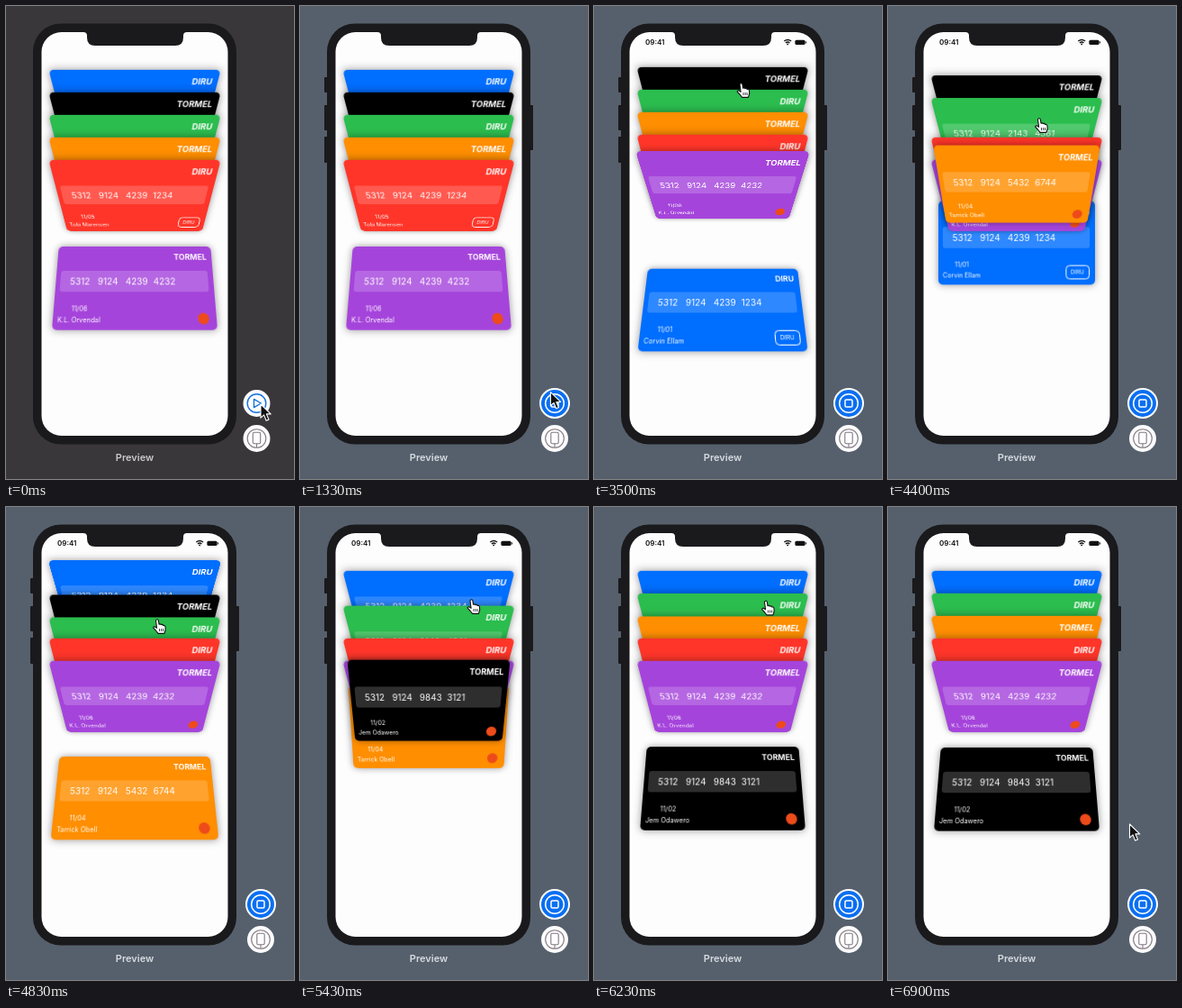
An HTML page for the animation above (6.93 s loop, 320 by 525 pixels).

```html
<!DOCTYPE html>
<html lang="en">
<head>
<meta charset="utf-8">
<title>Wallet preview</title>
<style>
  html, body { margin: 0; width: 100%; height: 100%; overflow: hidden; }
  body { position: relative; font-family: Inter, "Open Sans", sans-serif; background: #39373a; }
  svg.layer { position: absolute; left: 0; top: 0; width: 320px; height: 525px; }
  #cards { position: absolute; left: 40px; top: 29px; width: 206px; height: 448px; }
  .card {
    position: absolute; left: 15.25px; top: 0; width: 175.5px; height: 94.2px;
    border-radius: 5px; color: #fff; box-shadow: 0 0 8px rgba(0, 0, 0, .42);
  }
  .card > * { position: absolute; line-height: 1; white-space: pre; }
  .brand { right: 5.2px; top: 8px; font-size: 9px; font-weight: 700; }
  .panel { left: 5.2px; top: 28.8px; width: 165px; height: 24.2px; border-radius: 3px; background: rgba(255, 255, 255, .18); }
  .num { top: 36.2px; font-size: 10px; }
  .owner { left: 5px; top: 68.2px; font-size: 7.2px; text-align: center; }
  .owner div { height: 11.4px; }
  .badge {
    left: 142.7px; top: 71.5px; width: 27px; height: 16px; box-sizing: border-box;
    border: .7px solid #fff; border-radius: 4.5px;
    font-size: 6.3px; text-align: center; padding-top: 4.2px;
  }
  .dot { left: 156.2px; top: 76px; width: 12px; height: 12px; border-radius: 50%; background: #ee4b1a; }
</style>
</head>
<body>
<svg class="layer" viewBox="0 0 320 525">
  <g id="keys" fill="#1a191b">
    <rect x="27" y="79" width="5" height="17" rx="1"/>
    <rect x="27" y="110" width="5" height="28" rx="1"/>
    <rect x="27" y="145" width="5" height="29" rx="1"/>
    <rect x="254" y="110" width="5" height="50" rx="1"/>
  </g>
  <rect x="30" y="19.5" width="226" height="467" rx="31" fill="#1a191b"/>
  <rect x="39.5" y="29" width="207" height="448" rx="22" fill="#fefdfe"/>
  <path d="M86 28.5V29q4 0 4 4v2q0 9 9 9h89q9 0 9-9v-2q0-4 4-4v-.5z" fill="#1a191b"/>
  <text id="label" x="143" y="505" font-size="11" font-weight="600" text-anchor="middle">Preview</text>
  <g id="status" fill="#111">
    <text x="57" y="43" font-size="8" font-weight="600">09:41</text>
    <g fill="none" stroke="#111" stroke-width="1.3">
      <path d="M211.3 39.1q4-3.2 7.8 0M212.9 40.9q2.3-1.8 4.6 0"/>
    </g>
    <circle cx="215.2" cy="42.4" r=".9"/>
    <rect x="223.4" y="37.7" width="11.2" height="5.2" rx="1.5"/>
    <rect x="235.2" y="39.2" width="1" height="2.2" rx=".5"/>
  </g>
  <g id="tools">
    <g id="play" fill="none" stroke="#1771df" stroke-width="1.4">
      <circle r="15" fill="#fdfdfd" stroke="none"/>
      <circle r="10.3"/>
      <path d="M-3-4.6L5 0-3 4.6z" stroke-linejoin="round"/>
    </g>
    <g id="stop" fill="none" stroke="#fff" stroke-width="1.5">
      <circle r="17" fill="#fff" stroke="none"/>
      <circle r="15" fill="#0a6ff2" stroke="none"/>
      <circle r="10.3"/>
      <rect x="-4" y="-4" width="8" height="8" rx="1.3"/>
    </g>
    <g transform="translate(0 39)" fill="none" stroke="#827a82" stroke-width="1.1">
      <circle r="15" fill="#fdfdfd" stroke="none"/>
      <circle r="10.3"/>
      <rect x="-4.2" y="-6.7" width="8.4" height="12.4" rx="1.5" fill="#fdfdfd"/>
      <path d="M0 5.7V10"/>
    </g>
  </g>
</svg>

<div id="cards"></div>

<svg class="layer" viewBox="0 0 320 525" style="z-index:20">
  <g id="arrow">
    <path d="M0 0V15.2L3.6 11.9 6.2 18.2 9 17 6.4 10.9H11.2z" fill="#111" stroke="#fff" stroke-width="1.1" stroke-linejoin="round"/>
  </g>
  <g id="hand">
    <path d="M-1.5 1Q-1.3-.4 0-.3 1.2-.2 1.4 1L2 5.2Q3.6 4.3 4.4 5.6 6 5 6.7 6.4 8.7 6 9 8L9.2 11 8 15.4H1L-1.6 12 -4.3 9.2Q-4.5 7.6-2.8 7.7L-.4 9.3z" fill="#fff" stroke="#111" stroke-width="1.1" stroke-linejoin="round"/>
    <path d="M2.5 10v3M4.6 10v3M6.6 10v3" stroke="#111" stroke-width=".8"/>
  </g>
</svg>

<script>
const LOOP = 6930;
const DIRU = "DIRU", TORMEL = "TORMEL";
const CARDS = [
  ["#006eff", DIRU, "5312 9124 4239 1234", "11/01", "Corvin Ellam"],
  ["#000000", TORMEL, "5312 9124 9843 3121", "11/02", "Jem Odawero"],
  ["#2bbd4e", DIRU, "5312 9124 2143 4561", "11/03", "Dalen Morvik"],
  ["#ff8e00", TORMEL, "5312 9124 5432 6744", "11/04", "Tarrick Obell"],
  ["#ff3529", DIRU, "5312 9124 4239 1234", "11/05", "Tobi Marensen"],
  ["#a544db", TORMEL, "5312 9124 4239 4232", "11/06", "K.L. Orvendal"]
];
// Which card is in front from which time on
const PICKS = [
  { at: -9999, id: 5 },
  { at: 3050, id: 0 },
  { at: 4318, id: 3 },
  { at: 5310, id: 1 }
];
// Pointer moves: start, end, and tip position reached
const MOVES = [
  [0, 0, 283, 442],
  [1250, 1930, 163, 91],
  [2750, 2950, 163.5, 86],
  [3700, 4240, 168, 125],
  [4900, 5250, 190.5, 103],
  [6200, 6860, 268.5, 352]
];
const LIVE = 250, STATUS = 1450;

const $ = id => document.getElementById(id);
const mix = (a, b, k) => a + (b - a) * k;
const ramp = (t, a, b) => Math.min(1, Math.max(0, (t - a) / (b - a || 1)));
const smooth = k => k * k * (3 - 2 * k);
const blend = (a, b, k) => `rgb(${a.map((v, i) => mix(v, b[i], k)).join()})`;
const show = (id, on) => { $(id).style.display = on ? "" : "none"; };

function spring(ms) {
  const w = 0.01 * ms, z = 0.5, r = Math.sqrt(1 - z * z);
  return 1 - Math.exp(-z * w) * (Math.cos(r * w) + z / r * Math.sin(r * w));
}

function makeCard([color, brand, number, date, name]) {
  const el = document.createElement("div");
  el.className = "card";
  el.style.background = color;
  const digits = number.split(" ").map((part, i) =>
    `<div class="num" style="left:${15.8 + 31 * i}px">${part}</div>`).join("");
  const mark = brand === DIRU ? `<div class="badge">${brand}</div>` : `<div class="dot"></div>`;
  el.innerHTML = `<div class="brand">${brand}</div><div class="panel"></div>${digits}` +
    `<div class="owner"><div>${date}</div><div>${name}</div></div>${mark}`;
  $("cards").append(el);
  return el;
}

const els = CARDS.map(makeCard);

// Resting place of a card while another one (or itself) is in front
function slot(id, front) {
  if (id === front) return { z: 9, y: 311.4, tilt: 10, size: 1 };
  const n = id > front ? id - 1 : id;
  return { z: n, y: 115.2 + 25 * n, tilt: -30, size: 0.955 };
}

function drawCards(t) {
  let n = PICKS.length - 1;
  while (PICKS[n].at > t) n--;
  const now = PICKS[n], before = PICKS[Math.max(0, n - 1)];
  const k = n ? spring(t - now.at) : 1;
  els.forEach((el, id) => {
    const a = slot(id, before.id), b = slot(id, now.id);
    const y = mix(a.y, b.y, k) - 29 - 47.1;
    el.style.zIndex = b.z;
    el.style.transform = `translateY(${y}px) perspective(185px) ` +
      `rotateX(${mix(a.tilt, b.tilt, k)}deg) scale(${mix(a.size, b.size, k)})`;
  });
}

function drawPointer(t) {
  let [, , x, y] = MOVES[0];
  for (const [from, to, tx, ty] of MOVES) {
    const k = smooth(ramp(t, from, to));
    x = mix(x, tx, k);
    y = mix(y, ty, k);
  }
  const inside = x < 250;
  show("hand", inside);
  show("arrow", !inside);
  $(inside ? "hand" : "arrow").setAttribute("transform", `translate(${x} ${y})`);
}

function drawStage(t) {
  const k = ramp(t, 200, 1100);
  document.body.style.background = blend([57, 55, 58], [86, 96, 109], k);
  $("label").setAttribute("fill", blend([202, 201, 203], [215, 219, 223], k));
  $("keys").setAttribute("opacity", k);
  show("status", t >= STATUS);
  show("play", t < LIVE);
  show("stop", t >= LIVE);
  const x = mix(278.5, 283, smooth(ramp(t, LIVE, LIVE + 200)));
  $("tools").setAttribute("transform", `translate(${x} 441)`);
}

let start;
function frame(now) {
  start ??= now;
  const t = (now - start) % LOOP;
  drawStage(t);
  drawCards(t);
  drawPointer(t);
  requestAnimationFrame(frame);
}
requestAnimationFrame(frame);
</script>
</body>
</html>
```
